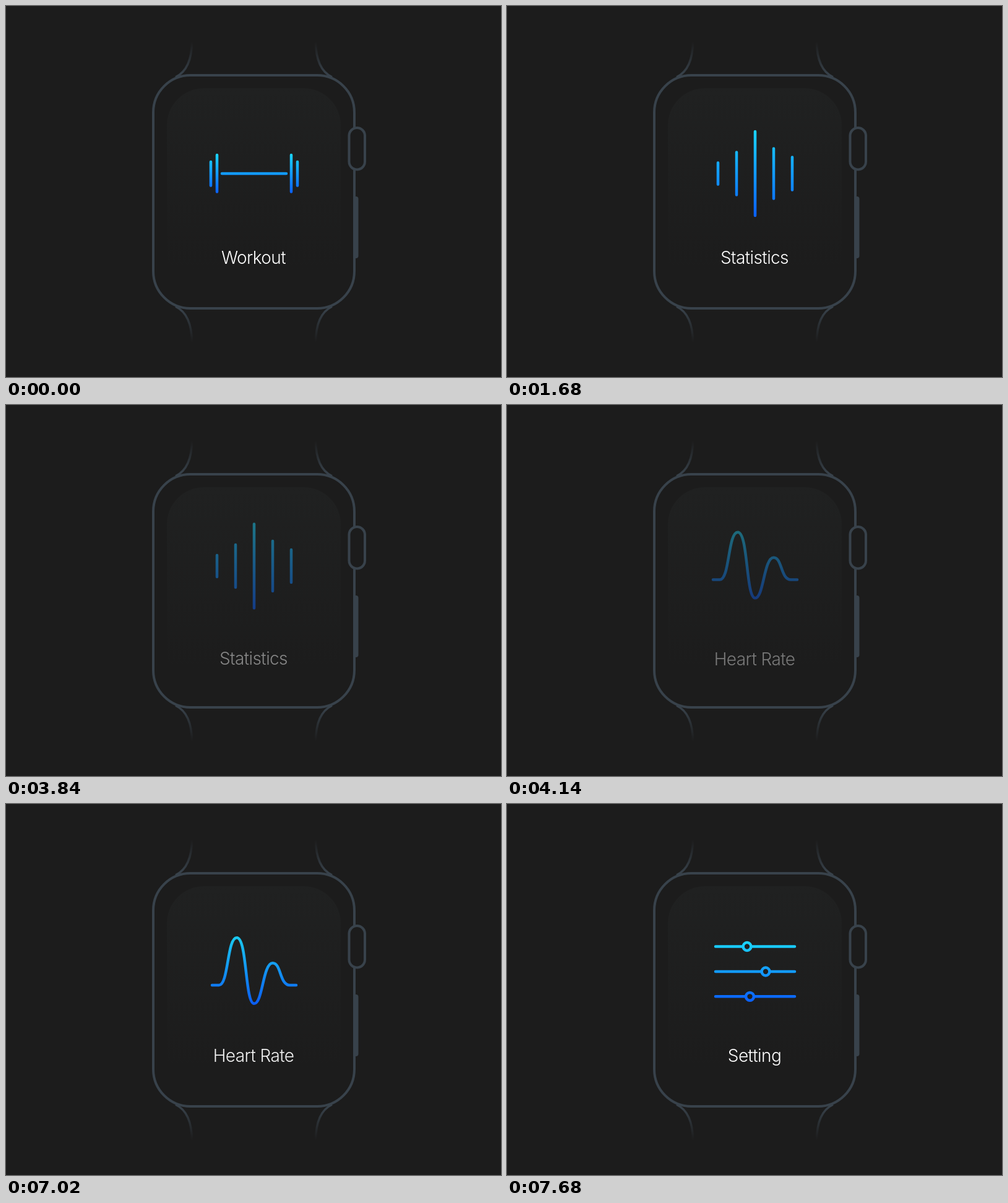
Write an HTML page with a canvas that moves like this. It is 800 by 600 pixels and loops after 8000 ms.

```html
<!DOCTYPE html>
<html lang="en">
<head>
<meta charset="utf-8">
<title>Watch menu</title>
<style>
  html, body { margin: 0; width: 100%; height: 100%; overflow: hidden; background: #1c1c1c; }
  canvas { display: block; }
</style>
</head>
<body>
<canvas id="stage" width="800" height="600"></canvas>
<script>
const ctx = document.getElementById('stage').getContext('2d');
const LOOP = 8000, STEP = 20, HALF = 340;
const BG = '#1c1c1c', LINE = '#38424b';

function vGradient(top, bottom, from, to) {
  const g = ctx.createLinearGradient(0, top, 0, bottom);
  g.addColorStop(0, from);
  g.addColorStop(1, to);
  return g;
}

// Each segment is x1, y1, x2, y2
function segments(...list) {
  const p = new Path2D();
  for (const [x1, y1, x2, y2] of list) {
    p.moveTo(x1, y1);
    p.lineTo(x2, y2);
  }
  return p;
}

function sliders(knobs) {
  const p = new Path2D(), r = 6.4;
  for (const [x, y] of knobs) {
    p.addPath(segments([337, y, x - r, y], [x + r, y, 465, y]));
    p.moveTo(x + r, y);
    p.arc(x, y, r, 0, Math.PI * 2);
  }
  return p;
}

const dumbbell = segments(
  [331, 252, 331, 290.5], [341, 241, 341, 300.5], [349, 271, 453, 271],
  [461, 241, 461, 300.5], [471, 252, 471, 290.5]);
const bars = segments(
  [341, 253.5, 341, 288.5], [371, 236.5, 371, 305.5], [401, 203, 401, 339],
  [431, 230.5, 431, 311.5], [461, 244.5, 461, 297.5]);
const pulse = new Path2D('M333 294.3H344C360 294.3 357 217.5 373 217.5' +
  'C390 217.5 386 324 401 324C415 324 415 258.5 431 258.5C445 258.5 442 294.3 459 294.3H469');
const settings = sliders([[388, 230.5], [418, 271], [392.5, 311.3]]);

// start: when the previous screen begins to leave
const screens = [
  { start: -HALF * 2, label: 'Workout', icon: dumbbell, top: 239, bottom: 303 },
  { start: 1000, label: 'Statistics', icon: bars, top: 201, bottom: 341 },
  { start: 3660, label: 'Heart Rate', icon: pulse, top: 215, bottom: 326 },
  { start: 7000, label: 'Setting', icon: settings, top: 222, bottom: 320 }
];

function strap(flipX, flipY) {
  ctx.save();
  ctx.translate(flipX ? 801 : 0, flipY ? 601 : 0);
  ctx.scale(flipX ? -1 : 1, flipY ? -1 : 1);
  ctx.strokeStyle = vGradient(58, 112, 'rgba(56,66,75,0)', LINE);
  ctx.lineWidth = 3.5;
  ctx.stroke(new Path2D('M300.5 56C300.5 86 293 106 274 115'));
  ctx.restore();
}

function roundRect(x, y, w, h, r, fill, stroke) {
  ctx.beginPath();
  ctx.roundRect(x, y, w, h, r);
  ctx.fillStyle = fill;
  ctx.fill();
  if (!stroke) return;
  ctx.strokeStyle = stroke;
  ctx.lineWidth = 4;
  ctx.stroke();
}

function drawWatch() {
  ctx.fillStyle = BG;
  ctx.fillRect(0, 0, 800, 600);
  ctx.lineCap = 'butt';
  for (const flipX of [false, true])
    for (const flipY of [false, true]) strap(flipX, flipY);
  roundRect(562, 308, 7.5, 100, [0, 4, 4, 0], LINE);
  roundRect(238, 112, 325, 377, 60, BG, LINE);
  roundRect(554.5, 197, 25.5, 67.5, 12.75, BG, LINE);
  roundRect(260, 133, 281, 334, 60, vGradient(133, 425, '#202121', BG));
}

function drawScreen(s, away) {
  ctx.globalAlpha = 1 - away;
  ctx.save();
  ctx.translate(0, -20 * away);
  ctx.lineCap = 'round';
  ctx.lineWidth = 4.5;
  ctx.strokeStyle = vGradient(s.top, s.bottom, '#1ad5fd', '#0a60ff');
  ctx.stroke(s.icon);
  ctx.restore();
  ctx.font = '300 28px Inter, "Open Sans", sans-serif';
  ctx.letterSpacing = '-0.6px';
  ctx.textAlign = 'center';
  ctx.fillStyle = '#fff';
  ctx.fillText(s.label, 400, 417 + 6 * away);
  ctx.globalAlpha = 1;
}

function draw(time) {
  const t = Math.floor(time % LOOP / STEP) * STEP;
  const i = screens.findLastIndex(s => t >= s.start);
  const phase = (t - screens[i].start) / HALF;
  drawWatch();
  if (phase < 1) drawScreen(screens[i - 1], phase);
  else drawScreen(screens[i], Math.max(0, 2 - phase));
}

const begin = performance.now();
function tick() {
  draw(performance.now() - begin);
  requestAnimationFrame(tick);
}
tick();
</script>
</body>
</html>
```
